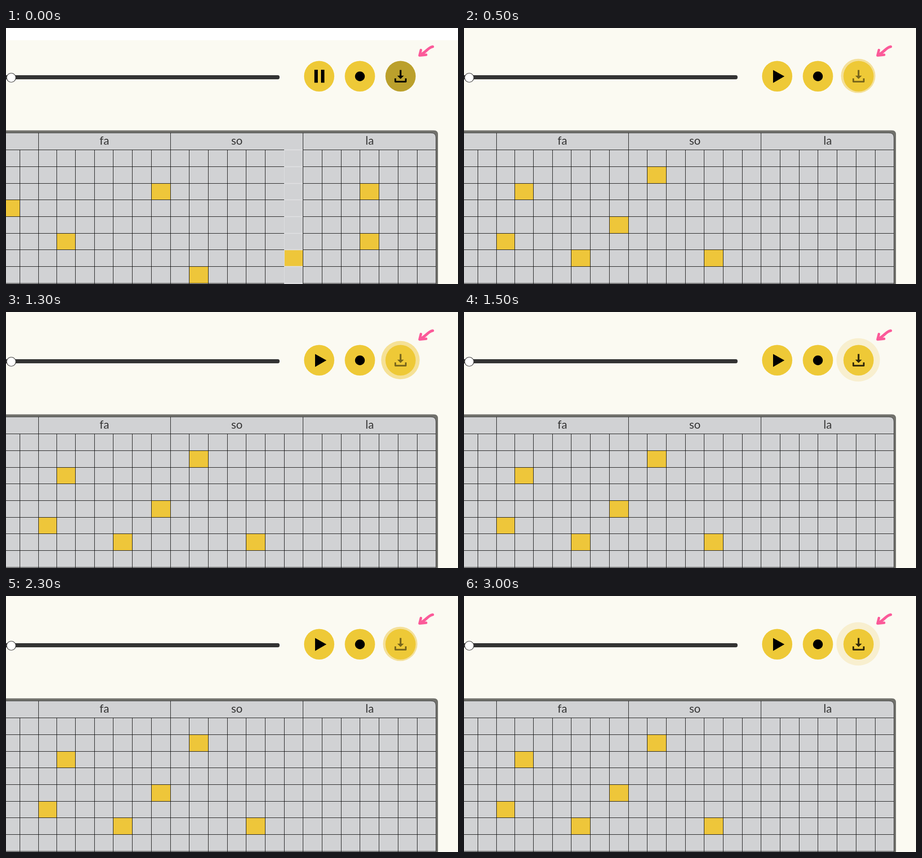
These frames come from a looping animation (993 px wide and 564 px high, 3.5 s). An HTML page:

```html
<!DOCTYPE html>
<html lang="en">
<head>
<meta charset="utf-8">
<title>Melody grid</title>
<style>
html, body { margin: 0; width: 100%; height: 100%; overflow: hidden; background: #fbfaf2; }
svg { display: block; width: 993px; height: 564px; }
text { font: 25px Lato, "Open Sans", sans-serif; fill: #333; text-anchor: middle; }
.btn { fill: #eec937; }
.cell { fill: #eec63a; }
.line { fill: none; stroke: #0c0c0c; stroke-width: 1; shape-rendering: crispEdges; }
.glow { fill: none; stroke: #dfe0e2; stroke-width: 2; }
.intro, .idle, #ring, #save, #icon { animation: 3.5s step-end infinite; }
.intro { animation-name: intro; }
.idle { animation-name: idle; }
#ring { animation-name: ring; }
#save { animation-name: save; }
#icon { animation-name: icon; }
@keyframes intro { 0% { opacity: 1 } 14.285%, 100% { opacity: 0 } }
@keyframes idle { 0% { opacity: 0 } 14.285%, 100% { opacity: 1 } }
@keyframes save { 0% { fill: #bba02c } 14.285%, 100% { fill: #eec937 } }
@keyframes ring {
  0% { r: 0; fill: #f5e196 }
  14.285%, 57.142% { r: 37.8px; cx: 866px; cy: 105.5px; fill: #f4e09a }
  28.571%, 71.428% { r: 42.3px; cx: 866.5px; cy: 106px; fill: #f5e196 }
  42.857%, 85.714%, 100% { r: 47.7px; cx: 866px; cy: 105.5px; fill: #f8efcf }
}
@keyframes icon {
  0% { opacity: 1 }
  14.285%, 57.142% { opacity: .5 }
  42.857%, 85.714%, 100% { opacity: .8 }
}
</style>
</head>
<body>
<svg viewBox="0 0 993 564">
  <rect width="993" height="564" fill="#fbfaf2"/>
  <rect class="intro" width="993" height="27" fill="#fff"/>

  <!-- slider -->
  <rect x="-20" y="104" width="621" height="9" rx="4" fill="#333"/>
  <circle cx="11.5" cy="109.5" r="10" fill="#fff" stroke="#333" stroke-width="1.2"/>

  <!-- buttons -->
  <circle id="ring" cx="866" cy="105.5" r="0"/>
  <g class="btn">
    <ellipse cx="688" cy="106.2" rx="33.2" ry="33.8"/>
    <ellipse cx="777.5" cy="106.2" rx="33.2" ry="33.8"/>
    <ellipse id="save" cx="866.8" cy="106.2" rx="33.2" ry="33.8"/>
  </g>
  <path class="intro" d="M677.5 92h7.5v28.5h-7.5zM692 92h7.5v28.5h-7.5z"/>
  <path class="idle" d="M679 92.5L704 106.5L679 121z"/>
  <circle cx="777.5" cy="106.5" r="10.7"/>
  <g id="icon">
    <path d="M864.9 92.5h3.8v12.5h5.3l-7.2 7.2l-7.2-7.2h5.3z"/>
    <path d="M855.3 111v7.2h23v-7.2" fill="none" stroke="#000" stroke-width="3.5" stroke-linejoin="round"/>
  </g>

  <g fill="none" stroke="#fb5a99" stroke-linecap="round" stroke-linejoin="round">
    <path d="M937.5 41.2C928 42.5 925 51 911 59" stroke-width="5.8"/>
    <path d="M911.5 48.5L908.5 60.5L923 59" stroke-width="5.4"/>
  </g>

  <!-- board -->
  <path d="M0 225.5H940Q949 225.5 949 234.5V564H0z" fill="#71716c"/>
  <path d="M0 231H934Q944.5 231 944.5 242V564H0z" fill="#d1d2d4"/>
  <path d="M0 231.2H934Q944.5 231.2 944.5 242V564" fill="none" stroke="#333" stroke-width="1"/>
  <text x="216" y="257">fa</text>
  <text x="507.3" y="257">so</text>
  <text x="799" y="257">la</text>
  <g id="first" class="intro"></g>
  <g id="second" class="idle"></g>
  <path id="lines" class="line"/>
  <g id="playhead" class="intro"></g>
</svg>
<script>
const cols = [-11, 30, 71, 111, 152, 194, 235, 277, 319, 361, 402, 444,
  486, 527, 569, 611, 652, 694, 736, 777, 819, 861, 903, 944];
const rows = [268, 305, 342, 378, 415, 452, 488, 525, 562];
const $ = id => document.getElementById(id);

const cell = ([c, r]) => `<rect class="cell" x="${cols[c]}" y="${rows[r]}"
  width="${cols[c + 1] - cols[c]}" height="${rows[r + 1] - rows[r]}"/>`;
const fill = (id, notes) => $(id).innerHTML = notes.map(cell).join('');

fill('first', [[8, 2], [19, 2], [0, 3], [3, 5], [19, 5], [10, 7]]);
fill('second', [[10, 1], [3, 2], [8, 4], [2, 5], [6, 6], [13, 6]]);

// Every seventh column line carries on through the header.
const upright = cols.slice(1, -1).map((x, i) => `M${x + .5} ${i % 7 == 1 ? 231 : 268}V564`);
const level = rows.map(y => `M0 ${y + .5}H944`);
$('lines').setAttribute('d', upright.concat(level).join(''));

const strokes = rows.map(y => `M611 ${y + .5}H652`).join('');
$('playhead').innerHTML = '<rect x="611" y="268" width="41" height="296" fill="#d1d2d4"/>'
  + cell([15, 6]) + `<path class="glow" d="${strokes}"/>`
  + '<path d="M611.5 268V564" stroke="#dfe0e2"/>';
</script>
</body>
</html>
```
